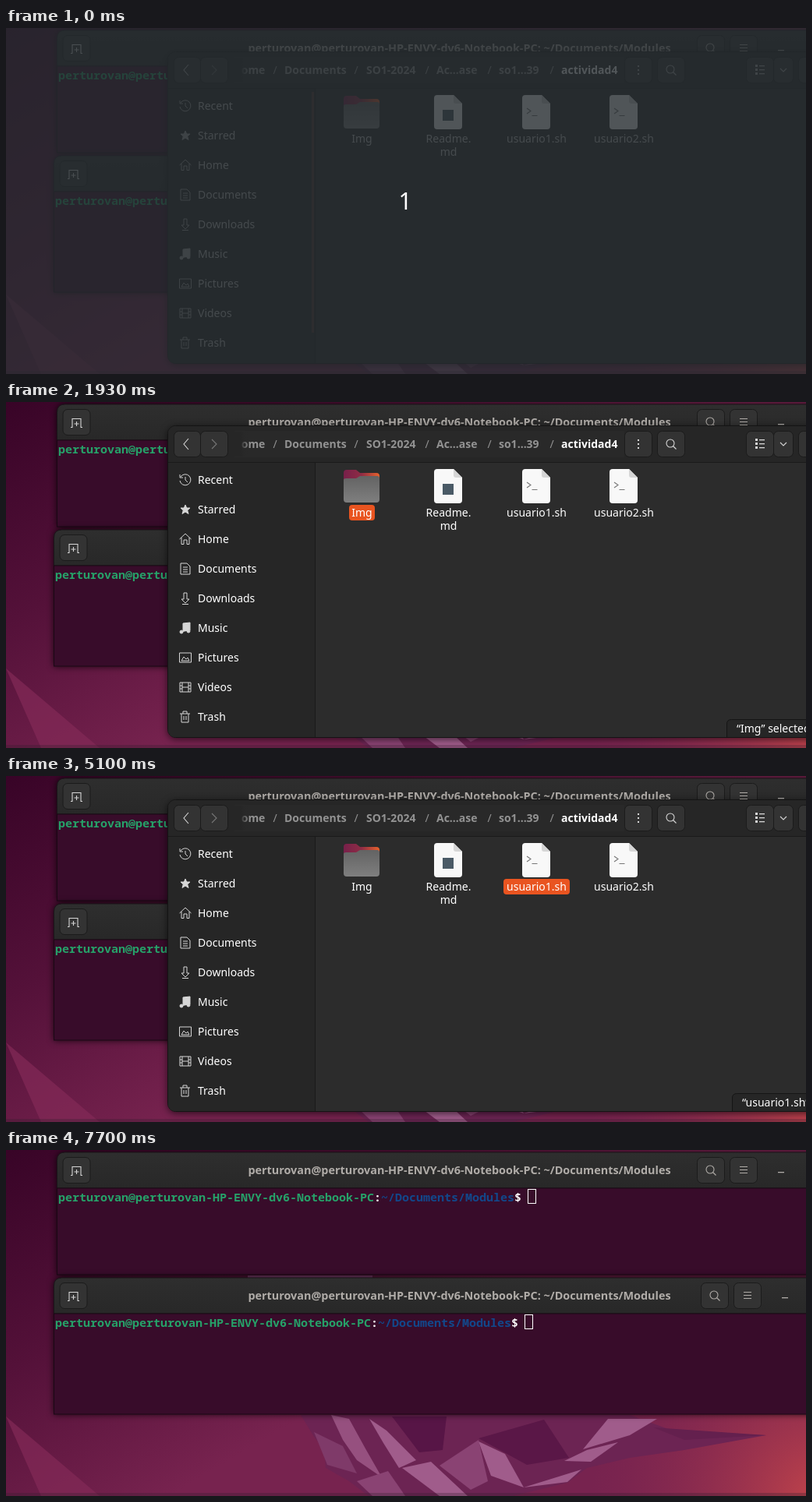
Recreate the animation shown at these times as an HTML page. Size 1026 by 444 pixels, loop 8 s.

```html
<!DOCTYPE html>
<html lang="en">
<head>
<meta charset="utf-8">
<title>Desktop</title>
<style>
  html, body { margin: 0; width: 100%; height: 100%; overflow: hidden; background: #6e2049; }
  svg { display: block; }
  text { font: 14px "Noto Sans", sans-serif; fill: #fff; white-space: pre; }
  .bold { font-weight: 700; }
  .title { font-weight: 700; font-size: 14.4px; }
  .mono { font: 700 15px "Noto Sans Mono", monospace; }
  .count { font-size: 30px; }
  .mid { text-anchor: middle; }
  .line { fill: none; stroke: #d6d6d6; stroke-width: 1.1; }
  .btn { fill: #333; stroke: #1b1b1b; }
  .term { filter: drop-shadow(0 0 4px rgba(0, 0, 0, .75)); }
  #files { filter: drop-shadow(0 2px 5px rgba(0, 0, 0, .6)); }
  .ink { opacity: calc(.7 + .3 * var(--focus)); }
</style>
</head>
<body>
<svg id="stage" width="1026" height="444" viewBox="0 0 1026 444"></svg>
<script>
const stage = document.getElementById('stage');
const LOOP = 8000, ORANGE = '#e95420';
const USER = 'perturovan', HOST = USER + '@' + USER + '-HP-ENVY-dv6-Notebook-PC', CWD = '~/Documents/Modules';

const rect = (x, y, w, h, fill, extra = '') =>
  `<rect x="${x}" y="${y}" width="${w}" height="${h}" fill="${fill}" ${extra}/>`;
const label = (x, y, s, cls = '', fill = '#fff') =>
  `<text x="${x}" y="${y}" class="${cls}" style="fill:${fill}">${s}</text>`;
const shape = (d, fill, x = 0, y = 0) => `<path d="${d}" fill="${fill}" transform="translate(${x} ${y})"/>`;
const icon = (d, x, y, color = '#d6d6d6') =>
  `<path class="line" d="${d}" transform="translate(${x} ${y})" style="stroke:${color}"/>`;
const button = (x, y, w) => `<rect class="btn" x="${x + .5}" y="${y + .5}" width="${w - 1}" height="33" rx="6"/>`;
const gradient = (id, coords, ...stops) => `<linearGradient id="${id}" ${coords}>` +
  stops.map(([at, color]) => `<stop offset="${at}" stop-color="${color}"/>`).join('') + '</linearGradient>';

const ICON = {
  tab: 'M-7.500 5.500H-5.500V-5.500H5.500V5.500H7.500M0-2V4M-3 1H3',
  search: 'M4-1A5 5 0 1 1-6-1A5 5 0 1 1 4-1M2.500 2.500L6.500 6.500',
  menu: 'M-5-4.500H5M-5-.5H5M-5 3.500H5',
};

const PLACES = {
  Recent: 'M-6-4A7 7 0 1 1-7 1M-7-7V-3H-3M0-4V0L3 3',
  Starred: 'M0-6L1.700-2 6-2 2.700 1 4 5.500 0 3-4 5.500-2.700 1-6-2-1.700-2Z',
  Home: 'M-7.500 0L0-7 7.500 0M-5-2V6.500H-2V1H2V6.500H5V-2',
  Documents: 'M-6-7H2L6-3V7H-6ZM-3-2H3M-3 1H3M-3 4H3',
  Downloads: 'M-2-7H2V1H5L0 6-5 1H-2ZM-4 7.500H4',
  Music: 'M-3 5V-6L6-7V3M-3 5A2 2 0 1 1-7 5A2 2 0 1 1-3 5M6 4A2 2 0 1 1 2 4A2 2 0 1 1 6 4',
  Pictures: 'M-7.500-6H7.500V6H-7.500ZM-5 4L-2-1 1 2 3 0 5 4Z',
  Videos: 'M-7-6H7V6H-7ZM-4-6V6M4-6V6M-7-2H-4M-7 2H-4M4-2H7M4 2H7M-4 0H4',
  Trash: 'M-7-4H6M-3-4V-7H2V-4M-5-4V7H4V-4M-2-1V4M1-1V4',
};

const FILES = [
  { x: 456.5, half: 16.5, lines: ['Img'], status: ['“Img” selected (containing 3 items)', 924] },
  { x: 567.5, half: 33.5, lines: ['Readme.', 'md'], status: ['“Readme.md” selected (1.2 kB)', 931] },
  { x: 680.5, half: 42.5, lines: ['usuario1.sh'], status: ['“usuario1.sh” selected (189 bytes)', 931] },
  { x: 792.5, half: 42.5, lines: ['usuario2.sh'], status: ['“usuario2.sh” selected (189 bytes)', 931] },
];
// [time, index of the file that becomes selected]
const CLICKS = [[1730, 0], [2970, 1], [3200, 2], [3400, 3], [4900, 2], [5370, 3], [5800, 2], [6070, 3]];

function wallpaper() {
  const facets = [
    ['#6c2453', '378,340 395,368 408,385 410,408 440,425 465,444 650,444 720,427 745,408 800,395 870,385 975,366 860,362 800,340'],
    ['#96507f', '417,340 440,345 462,385 482,420 450,398 432,372'],
    ['#7f3a69', '395,362 432,380 450,415 412,404'],
    ['#a05c8b', '466,345 488,360 526,398 504,408 484,376'],
    ['#571546', '495,342 565,342 560,385 530,388'],
    ['#8a4373', '450,425 490,412 512,444 470,444'],
    ['#a05c8b', '508,408 545,400 592,444 556,444'],
    ['#8a4373', '556,405 606,372 618,425 596,436'],
    ['#5a1747', '606,370 690,346 722,395 668,404'],
    ['#a05c8b', '606,374 640,390 664,433 622,418'],
    ['#a05c8b', '664,433 738,410 720,426'],
    ['#a05c8b', '716,399 745,385 785,375 750,400'],
    ['#a05c8b', '772,345 835,345 800,366 740,384'],
    ['#64204e', '830,356 975,366 870,372'],
  ];
  return rect(0, 0, 1026, 444, 'url(#sky)') + rect(0, 0, 1026, 444, 'url(#glow)') +
    '<polygon points="0,342 120,444 45,444" fill="#832a57" opacity=".7"/>' +
    facets.map(([fill, points]) => `<polygon points="${points}" fill="${fill}"/>`).join('') +
    rect(310, 161, 160, 3, '#8a4478') + rect(0, 440, 1026, 4, '#321c2c', 'opacity=".3"');
}

function terminal(x, y, height, right) {
  const grey = '#b0aca8';
  return `<g class="term">
    <path d="M${x} ${y + 46}v-36q0-10 10-10H1040v46z" fill="url(#bar)" stroke="#1a1519"/>
    ${rect(x, y + 46, 990, height - 46, '#380c2a', 'stroke="#1a0814"')}</g>
    ${button(x + 7, y + 6, 36)}${icon(ICON.tab, x + 25, y + 24)}
    ${label(581.5, y + 28, `${HOST}: ${CWD}`, 'title mid', grey)}
    ${button(right, y + 6, 36)}${icon(ICON.search, right + 18, y + 23, grey)}
    ${button(right + 42, y + 6, 36)}${icon(ICON.menu, right + 60, y + 23, grey)}
    ${rect(right + 104, y + 25, 8, 1.3, grey)}
    <text x="${x + 1.5}" y="${y + 63}" class="mono" style="fill:#26a269">${HOST}<tspan fill="#fff">:</tspan><tspan
      fill="#12488b">${CWD}</tspan><tspan fill="#fff">$</tspan></text>
    ${rect(x + 604, y + 47.5, 10, 18, 'none', 'stroke="#fff"')}`;
}

function pathBar() {
  const crumbs = [[357, 'Documents'], [462, 'SO1-2024'], [552, 'Ac…ase'], [632, 'so1…39']];
  return rect(293, 37, 500, 34, '#292929') + label(291, 59, 'Home', 'bold', '#929292') +
    rect(286, 38, 26, 32, 'url(#fade)') +
    [345, 449, 540, 620, 700].map(x => label(x, 59, '/', 'mid', '#929292')).join('') +
    crumbs.map(([x, s]) => label(x, 59, s, 'bold', '#929292')).join('') + label(712, 59, 'actividad4', 'bold');
}

function fileIcon(x, i) {
  if (i === 0) return shape('M433 91q0-4 4-4h12l5 4h21q4 0 4 4v10h-46z', 'url(#tab)') +
    shape('M433 100q0-2 3-2h13l5-3h22q3 0 3 3v27q0 4-4 4h-38q-4 0-4-4z', 'url(#folder)');
  return shape('M-18-18q0-4 4-4H7L18-11V18q0 4-4 4H-14q-4 0-4-4z', '#f8f8f8', x - .5, 108) +
    shape('M7-22L18-11H10q-3 0-3-3z', '#d6d6d6', x - .5, 108) +
    (i === 1 ? rect(x - 7.5, 105, 14, 14, '#4a5a66') : icon('M-12.500-5L-7.500-1.500-12.500 2M-6 4.500H1', x, 108, '#777'));
}

function fileManager() {
  const places = Object.entries(PLACES).map(([name, d], i) => {
    const y = 100 + 38 * i, fill = /Starred|Music/.test(name) ? '#d6d6d6' : 'none';
    return `<path d="${d}" fill="${fill}" stroke="#d6d6d6" transform="translate(230 ${y})"/>` + label(246, y + 5, name);
  }).join('');
  const files = FILES.map(({ x, half, lines }, i) => fileIcon(x, i) +
    rect(x - half, 132, 2 * half, 3 + 17 * lines.length, ORANGE, 'rx="4" class="pick"') +
    `<g class="ink">${lines.map((s, n) => label(x, 147 + 17 * n, s, 'mid')).join('')}</g>`).join('');
  return `<g id="files">
    ${rect(207.5, 30.5, 980, 400, '#2c2c2c', 'rx="10" stroke="#141414"')}
    <path d="M208 77V41q0-10 10-10H1177q10 0 10 10V77z" fill="#262626"/>
    <path d="M208 77H396V430H218q-10 0-10-10z" fill="#262626"/>
    ${rect(208, 77, 979, 1, '#1a1a1a')}${rect(396, 78, 1, 352, '#1a1a1a')}
    ${button(215, 37, 35)}${button(249, 37, 36)}${pathBar()}
    ${[[793, 36], [835, 36], [949, 36], [984, 26], [1016, 36], [1060, 36], [1104, 36]].map(([x, w]) => button(x, 37, w)).join('')}
    <g class="ink">
      ${icon('M3-7L-3 0 3 7', 231, 54)}${icon('M-3-6L3 0-3 6', 267, 54, '#777')}
      ${[-5, 0, 5].map(dy => rect(810, 53 + dy, 2, 2, '#d6d6d6')).join('')}
      ${icon(ICON.search, 853, 54)}${icon('M-4 0L0 4 4 0', 997, 52)}
      ${[-5, 0, 5].map(dy => rect(961, 52 + dy, 3, 3, '#d6d6d6') + rect(966, 53 + dy, 7, 1.3, '#d6d6d6')).join('')}
      ${places}
    </g>
    ${rect(392, 82, 3, 309, '#4a3531', 'id="scroll"')}${files}
    <g id="status"><path id="statusBox" fill="#262626" stroke="#151515"/><text id="statusText" y="424"></text></g>
  </g>`;
}

stage.innerHTML = `<defs>
  ${gradient('sky', 'gradientUnits="userSpaceOnUse" x1="0" y1="0" x2="250" y2="420"',
    [0, '#380427'], [.5, '#541139'], [1, '#77234f'])}
  <radialGradient id="glow" gradientUnits="userSpaceOnUse" cx="1050" cy="450" r="300">
    <stop stop-color="#c4454a"/><stop offset="1" stop-color="#8a2a50" stop-opacity="0"/></radialGradient>
  ${gradient('bar', 'x2="0" y2="1"', [0, '#2e2e2e'], [1, '#282828'])}
  ${gradient('tab', '', [0, '#77204a'], [.5, '#8f2c45'], [1, '#e8622c'])}
  ${gradient('folder', 'x2="0" y2="1"', [0, '#636363'], [1, '#7f7f7f'])}
  <linearGradient id="fade"><stop offset=".55" stop-color="#262626"/><stop offset="1" stop-color="#292929" stop-opacity="0"/></linearGradient>
  </defs>${wallpaper()}${terminal(65.5, 3, 157, 886)}${terminal(61.5, 164, 175, 891)}${fileManager()}
  <g id="countdown">${rect(0, 0, 1026, 444, '#262c30', 'opacity=".8"')}${label(512, 233, '1', 'count mid')}</g>`;

const el = id => document.getElementById(id);
const picks = [...document.querySelectorAll('.pick')];
const show = (node, on) => node.setAttribute('visibility', on ? 'visible' : 'hidden');
const selectedAt = t => CLICKS.reduce((last, [at, file]) => t >= at ? file : last, -1);

function render(t) {
  show(el('countdown'), t < 30);
  show(el('scroll'), t < 330);
  stage.style.setProperty('--focus', Math.min(1, Math.max(0, (t - 570) / 200)));

  const selected = selectedAt(t), described = selectedAt(t - 200);
  picks.forEach((node, i) => show(node, i === selected));
  el('status').style.display = described < 0 ? 'none' : '';
  if (described >= 0) {
    const [text, x] = FILES[described].status;
    el('statusBox').setAttribute('d', `M${x + .5} 430V413q0-5.500 6-5.500H1187V430`);
    el('statusText').setAttribute('x', x + 13);
    el('statusText').textContent = text;
  }

  // The window shrinks towards a point beyond the top left corner.
  const shrink = (t - 7600) / 100 * .3;
  const sx = t < 7600 ? 1 : .339 - shrink, sy = t < 7600 ? 1 : .3715 - shrink;
  el('files').setAttribute('transform', `matrix(${sx} 0 0 ${sy} ${-140.5 * (1 - sx)} ${-54.5 * (1 - sy)})`);
  el('files').style.display = t < 7700 ? '' : 'none';
}

const start = performance.now();
function tick() {
  render((performance.now() - start) % LOOP);
  requestAnimationFrame(tick);
}
tick();
</script>
</body>
</html>
```
